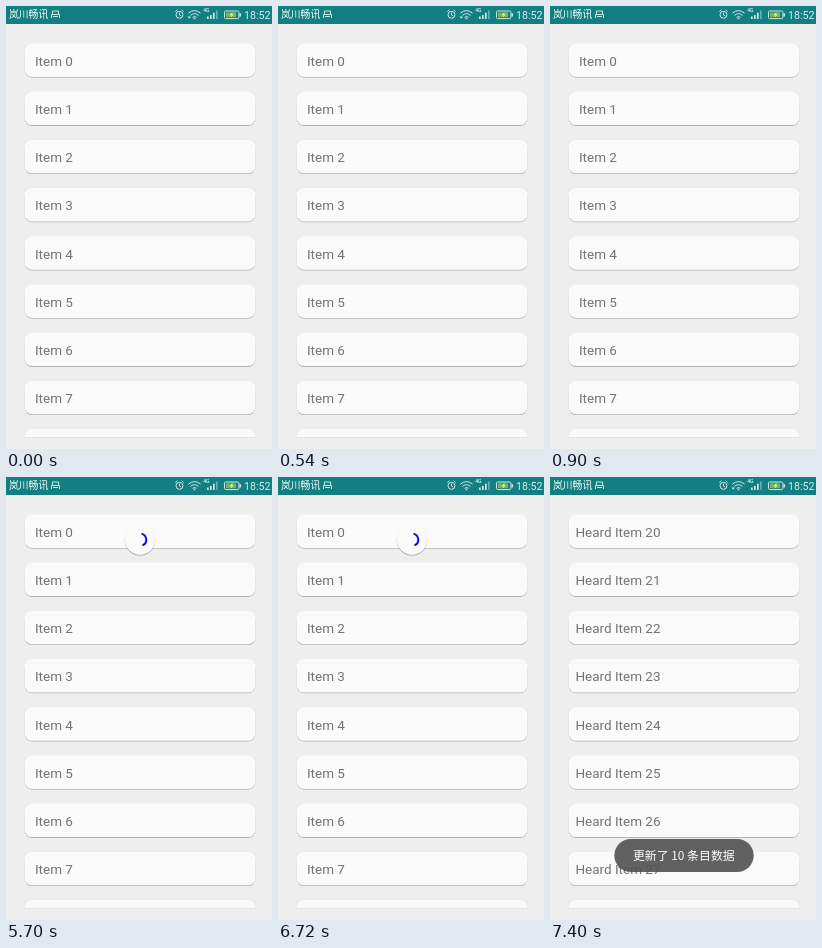
Recreate the animation shown at these times as an HTML page. Size 266 by 443 pixels, loop 8 s.

```html
<!DOCTYPE html>
<html lang="zh-CN">
<head>
<meta charset="utf-8">
<title>Pull to refresh list</title>
<style>
  html, body { margin: 0; width: 100%; height: 100%; overflow: hidden; background: #eee; }
  svg { display: block; width: 266px; height: 443px; }
  .label { font: 13.5px Roboto, sans-serif; fill: #747474; }
  .cjk { font-family: "Noto Sans CJK SC", "Noto Sans CJK", sans-serif; }
  .line { fill: none; stroke: #cfe5e5; }
  .solid { fill: #cfe5e5; }
</style>
</head>
<body>
<svg viewBox="0 0 266 443" xmlns="http://www.w3.org/2000/svg">
  <defs>
    <clipPath id="view"><rect y="17" width="266" height="414.5"/></clipPath>
    <filter id="soft" x="-20%" y="-20%" width="140%" height="150%"><feGaussianBlur stdDeviation="0.7"/></filter>
  </defs>
  <rect width="266" height="443" fill="#eee"/>
  <g id="list" clip-path="url(#view)"></g>

  <g id="spinner">
    <circle cx="134" cy="63.3" r="15.4" fill="#000" opacity=".25" filter="url(#soft)"/>
    <circle cx="134" cy="62.5" r="15.2" fill="#fafafa"/>
    <path id="arc" fill="none" stroke="#1408ee" stroke-width="2"/>
  </g>

  <g id="toast">
    <rect x="64.3" y="362" width="139.4" height="33" rx="16.5" fill="#535353" opacity=".91"/>
    <text class="cjk" x="133.8" y="383.3" font-size="11.9" text-anchor="middle" fill="#fff">更新了 10 条目数据</text>
  </g>

  <g id="status">
    <rect width="266" height="18" fill="#128082"/>
    <text class="cjk" x="3" y="12.4" font-size="9.8" font-weight="500" fill="#fff">岚川畅讯</text>
    <path class="line" d="M46.5 8V5h6v3M45.5 12V8.5h8V12M47 10.5h5"/>
    <g class="line">
      <circle cx="173.5" cy="8.8" r="3.5"/>
      <path d="M173.5 6.6v2.4l1.6 1M169.4 5.6l2-1.8M177.6 5.6l-2-1.8"/>
      <path d="M182.4 7.2q6.1-5.2 12.2 0M184.4 9.4q4.1-3.4 8.2 0M186.5 11.3q2-1.6 4 0"/>
    </g>
    <circle class="solid" cx="188.5" cy="12.4" r=".9"/>
    <path id="data" class="solid" d="M181.4 10.4h3.6l-1.8 2.4z"/>
    <text x="197.2" y="6.4" font-family="Roboto, sans-serif" font-size="5" font-weight="500" fill="#e4f0f0">4G</text>
    <path class="solid" d="M201 13v-2.4h1.7V13zM204 13V9h1.7v4zM207 13V6.8h1.7V13z"/>
    <path class="solid" d="M210 13V4.4h1.7V13z" opacity=".45"/>
    <rect class="line" x="218.5" y="5" width="14.4" height="7.6" rx="1.2"/>
    <rect x="220" y="6.4" width="10" height="4.8" fill="#7db548"/>
    <path class="solid" d="M233.4 7.2h1.6v3.2h-1.6z"/>
    <path d="M226.6 6l-2.8 3.2h1.8l-.8 2.4 2.8-3.2h-1.7z" fill="#f2f8e8"/>
    <text x="237.9" y="12.6" font-family="Roboto, sans-serif" font-size="10.7" fill="#d8e9e9">18:52</text>
  </g>
</svg>
<script>
const LOOP = 8000, PULL = 5700, LOADED = 7400, DATA_OFF = 900;
const ROWS = 9, TOP = 37.5, PITCH = 48.2;
const NS = "http://www.w3.org/2000/svg";
const $ = id => document.getElementById(id);

function add(parent, tag, attrs) {
  const el = document.createElementNS(NS, tag);
  for (const key in attrs) el.setAttribute(key, attrs[key]);
  return parent.appendChild(el);
}

function makeRow(i) {
  const y = TOP + i * PITCH;
  const card = (dy, attrs) => add($("list"), "rect",
    { x: 18.6, y: y + dy, width: 230.8, height: 33.4, rx: 7.5, ...attrs });
  card(0.8, { fill: "#000", opacity: 0.25, filter: "url(#soft)" });
  card(0, { fill: "#fafafa" });
  return add($("list"), "text", { class: "label", y: y + 22.2 });
}

function arcPath(cx, cy, r, from, to) {
  const at = deg => {
    const a = deg * Math.PI / 180;
    return `${cx + r * Math.cos(a)} ${cy + r * Math.sin(a)}`;
  };
  return `M${at(from)}A${r} ${r} 0 ${to - from > 180 ? 1 : 0} 1 ${at(to)}`;
}

const labels = Array.from({ length: ROWS }, (_, i) => makeRow(i));
$("arc").setAttribute("d", arcPath(133.9, 62.7, 6.3, -75, 66));

const show = (id, on) => $(id).setAttribute("visibility", on ? "visible" : "hidden");

function render(t) {
  const loaded = t >= LOADED;
  labels.forEach((label, i) => {
    label.setAttribute("x", loaded ? 25.4 : 28.9);
    label.textContent = loaded ? `Heard Item ${20 + i}` : `Item ${i}`;
  });
  show("spinner", t >= PULL && !loaded);
  show("toast", loaded);
  show("data", t < DATA_OFF || loaded);
}

const start = performance.now();
function tick() {
  render((performance.now() - start) % LOOP);
  requestAnimationFrame(tick);
}
tick();
</script>
</body>
</html>
```
